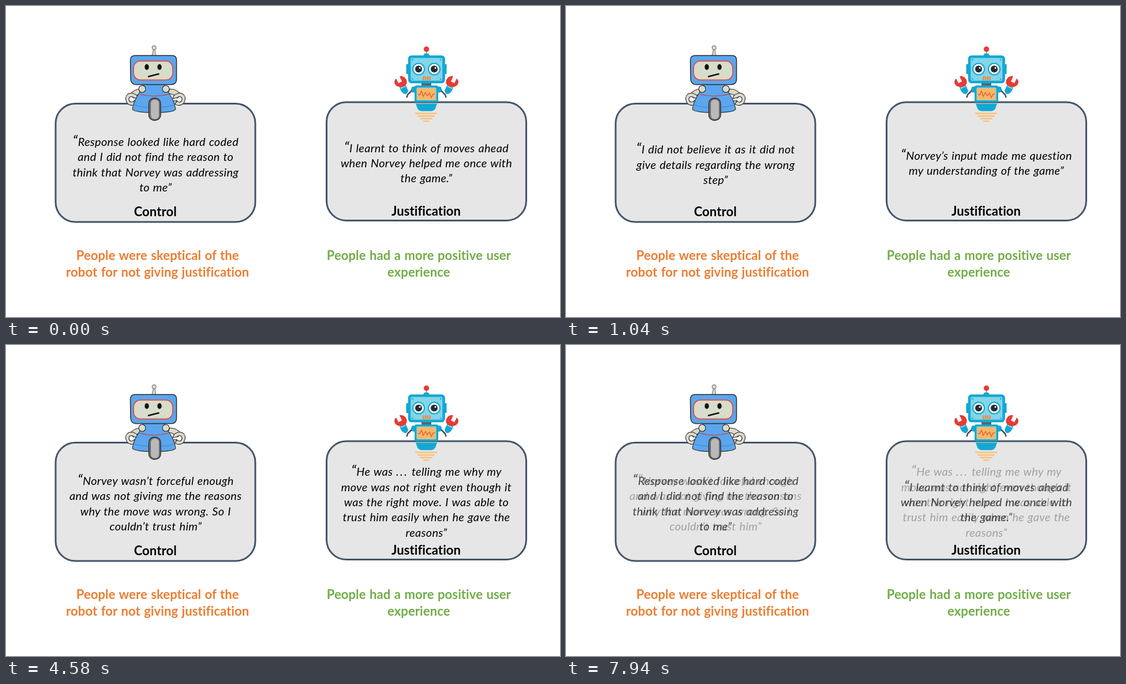
Write an HTML page that moves like this. It is 960 px wide and 540 px high and loops after 8 s.

```html
<!DOCTYPE html>
<html lang="en">
<head>
<meta charset="utf-8">
<title>Control and justification quotes</title>
<style>
html, body { margin: 0; width: 100%; height: 100%; overflow: hidden; background: #fff; }
svg { display: block; width: 960px; height: 540px; }
text { font-family: Lato, Carlito, sans-serif; text-anchor: middle; }
.bold { font-weight: 700; font-size: 22px; letter-spacing: .1px; word-spacing: 1px; }
.quote { font-style: italic; font-size: 19.9px; letter-spacing: .32px; word-spacing: .9px; }
.mark { font-size: 25.5px; }
.dots { letter-spacing: 2.4px; }
.card { fill: #e6e6e6; stroke: #44546a; stroke-width: 3; }

/* cross-fades run in 60 ms steps */
.q0 { animation: first 8s infinite; }
.q1 { animation: second 8s infinite; }
.q2 { animation: third 8s infinite; }
@keyframes first {
  0% { opacity: 1; }
  6.25% { opacity: 1; animation-timing-function: steps(10, start); }
  13.75% { opacity: 0; }
  94.75% { opacity: 0; animation-timing-function: steps(7, start); }
  100% { opacity: .7; }
}
@keyframes second {
  0% { opacity: 0; }
  6.25% { opacity: 0; animation-timing-function: steps(10, start); }
  13.75% { opacity: 1; }
  50.5% { opacity: 1; animation-timing-function: steps(10, start); }
  58%, 100% { opacity: 0; }
}
@keyframes third {
  0% { opacity: 0; }
  50.5% { opacity: 0; animation-timing-function: steps(10, start); }
  58% { opacity: 1; }
  94.75% { opacity: 1; animation-timing-function: steps(7, start); }
  100% { opacity: .3; }
}
</style>
</head>
<body>
<svg viewBox="0 0 960 540">
  <rect class="card" x="86" y="169.5" width="346" height="205.5" rx="34.25"/>
  <rect class="card" x="555.5" y="167" width="346" height="205.5" rx="34.25"/>

  <!-- skeptical robot -->
  <g stroke="#2b2b2b" stroke-width="1.1" stroke-linejoin="round">
    <defs>
      <g id="armA">
        <path d="M234 144 Q221 144 214 155 L222 160 Q227 152 238 152Z" fill="#dcd9cb"/>
        <path d="M221 152 C211 149 206 157 208 164 C210 173 221 175 226 169 L221 165 C218 169 213 166 213 162 C213 157 218 156 221 159 L229 161 Q228 154 221 152Z" fill="#dcd9cb"/>
        <path d="M222 164 L231 165 Q231 171 225 171Z" fill="#c9c6b6"/>
      </g>
    </defs>
    <use href="#armA"/>
    <use href="#armA" transform="matrix(-1 0 0 1 518 0)"/>
    <path d="M238 136 H275 C278 150 290 156 294 179 Q292 185 257 185 Q222 185 219 179 C223 156 235 150 238 136Z" fill="#5ba6ef"/>
    <path d="M231 153 Q256 160 282 153" fill="none" stroke="#b5545c" stroke-width="1.3"/>
    <path d="M222 172 Q256 181 291 172" fill="none" stroke="#4486cb"/>
    <circle cx="236" cy="144" r="6" fill="#dcd9cb"/>
    <circle cx="277" cy="144" r="6" fill="#dcd9cb"/>
    <path d="M255.4 76 H258 L260 88 Q256.5 91 252.5 88Z" fill="#dcd9cb" stroke="#777"/>
    <circle cx="256.7" cy="72.5" r="3.4" fill="#dedede" stroke="#777"/>
    <path d="M224 86 H288 Q295.500 86 295.500 94 V127 Q295.500 136 287 136.500 H225 Q216.500 136 216 127 L215.500 94 Q215.500 86 224 86Z" fill="#5ba6ef" stroke-width="1.5"/>
    <rect x="221" y="95.500" width="68" height="33" rx="12" fill="#d7dccb" stroke="#d4584f" stroke-width="2"/>
    <g stroke="none" fill="#111">
      <ellipse cx="244" cy="106" rx="3.700" ry="5"/>
      <ellipse cx="266" cy="106" rx="3.700" ry="5"/>
    </g>
    <path d="M247 122.5 L264.5 118" stroke="#111" stroke-width="2.6" stroke-linecap="round"/>
    <rect x="247.5" y="160" width="20.5" height="38.5" rx="9" fill="#777" stroke-width="1.4"/>
    <rect x="250.5" y="162" width="15" height="35" rx="7" fill="#b9b9b9" stroke="#555" stroke-width=".8"/>
  </g>

  <!-- cheerful robot -->
  <g>
    <defs>
      <g id="armB">
        <path d="M710 140 L704 140 Q701 144 702 149 L709 151Z" fill="#14a8d0"/>
        <path d="M703 147 L696 154 L694.500 159" fill="none" stroke="#444e5c" stroke-width="2.500"/>
        <path d="M682 141 L692 136 L697 147 Q696 153 691 153 Q684 150 682 141Z" fill="#14a8d0"/>
        <path d="M684 143 L692 139" stroke="#8edaec" stroke-width="2.500"/>
        <path d="M682 122 C689 120 696 127 694.500 134 Q692 140 685 141 Q674 140 673 133 Q673 128 676 126 L680 134 L686 131Z" fill="#e63b34"/>
      </g>
    </defs>
    <use href="#armB"/>
    <use href="#armB" transform="matrix(-1 0 0 1 1457 0)"/>
    <path d="M728.5 77 V86" stroke="#999" stroke-width="2"/>
    <circle cx="728.5" cy="75" r="4.7" fill="#e63b34"/>
    <path d="M722.5 87 L725 82.5 H732 L734.5 87Z" fill="#14a8d0"/>
    <path d="M695.5 101 V118 M761.5 101 V118" stroke="#14a8d0" stroke-width="4"/>
    <path d="M720 134 H737 V139 H720Z" fill="#58636e"/>
    <rect x="699" y="88" width="59.5" height="44" rx="4" fill="#83d5ea" stroke="#14a8d0" stroke-width="4.6"/>
    <g fill="#14a8d0">
      <circle cx="704.5" cy="93.5" r="1.3"/><circle cx="753" cy="93.5" r="1.3"/>
      <circle cx="704.5" cy="127" r="1.3"/><circle cx="753" cy="127" r="1.3"/>
    </g>
    <g fill="#fff" stroke="#14a8d0" stroke-width="2">
      <circle cx="715" cy="109.5" r="10"/><circle cx="742" cy="109.5" r="10"/>
    </g>
    <g fill="#252b36">
      <circle cx="715" cy="109.5" r="6"/><circle cx="742" cy="109.5" r="6"/>
    </g>
    <g fill="#fff"><circle cx="717" cy="107.5" r="1.5"/><circle cx="744" cy="107.5" r="1.5"/></g>
    <path d="M722 125.5 H736" stroke="#f08a3c" stroke-width="7" stroke-dasharray="2.6 1.2"/>
    <rect x="708" y="138" width="41" height="29" rx="3" fill="#14a8d0"/>
    <rect x="712" y="142" width="33" height="21.5" rx="1.5" fill="#f9b765" stroke="#83d5ea" stroke-width="1.2"/>
    <path d="M714 154 H717 L720 148 L723 157 L727 150 L730 156 L734 151 L737 159 L740 153 H743" fill="none" stroke="#e2583d" stroke-width="1.3"/>
    <path d="M710 169.5 H747 L744 178 Q741 182.5 736 182.5 H721 Q716 182.5 713 178Z" fill="#14a8d0"/>
    <path d="M709 186.5 H747 M713 191 H743 M717.5 195.5 H739 M723 200 H733.5" stroke="#f8c27a" stroke-width="2.4"/>
  </g>

  <g id="quotes"></g>

  <g class="bold">
    <text x="258.7" y="365">Control</text>
    <text x="728" y="364">Justification</text>
    <g fill="#ed7d31">
      <text x="262.7" y="441">People were skeptical of the</text>
      <text x="262.7" y="470">robot for not giving justification</text>
    </g>
    <g fill="#70ad47">
      <text x="715.3" y="441">People had a more positive user</text>
      <text x="715.3" y="470">experience</text>
    </g>
  </g>
</svg>
<script>
const LEADING = 26.3;
const columns = [
  { x: 259.3, y: 282.5, quotes: [
    'Response looked like hard coded|and I did not find the reason to|think that Norvey was addressing|to me”',
    'I did not believe it as it did not|give details regarding the wrong|step”',
    'Norvey wasn’t forceful enough|and was not giving me the reasons|why the move was wrong. So I|couldn’t trust him”'
  ] },
  { x: 728.5, y: 280, quotes: [
    'I learnt to think of moves ahead|when Norvey helped me once with|the game.”',
    'Norvey’s input made me question|my understanding of the game”',
    'He was … telling me why my|move was not right even though it|was the right move. I was able to|trust him easily when he gave the|reasons”'
  ] }
];

function quoteGroup({ x, y }, quote, order) {
  const lines = quote.split('|');
  const top = y - (lines.length - 1) / 2 * LEADING;
  const rows = lines.map((line, i) => {
    const mark = i ? '' : '<tspan class="mark">“</tspan>';
    const words = line.replace('…', '<tspan class="dots">...</tspan>');
    return `<text x="${x}" y="${top + i * LEADING}">${mark}${words}</text>`;
  });
  return `<g class="quote q${order}">${rows.join('')}</g>`;
}

document.getElementById('quotes').innerHTML = columns
  .map(col => col.quotes.map((q, i) => quoteGroup(col, q, i)).join(''))
  .join('');
</script>
</body>
</html>
```
